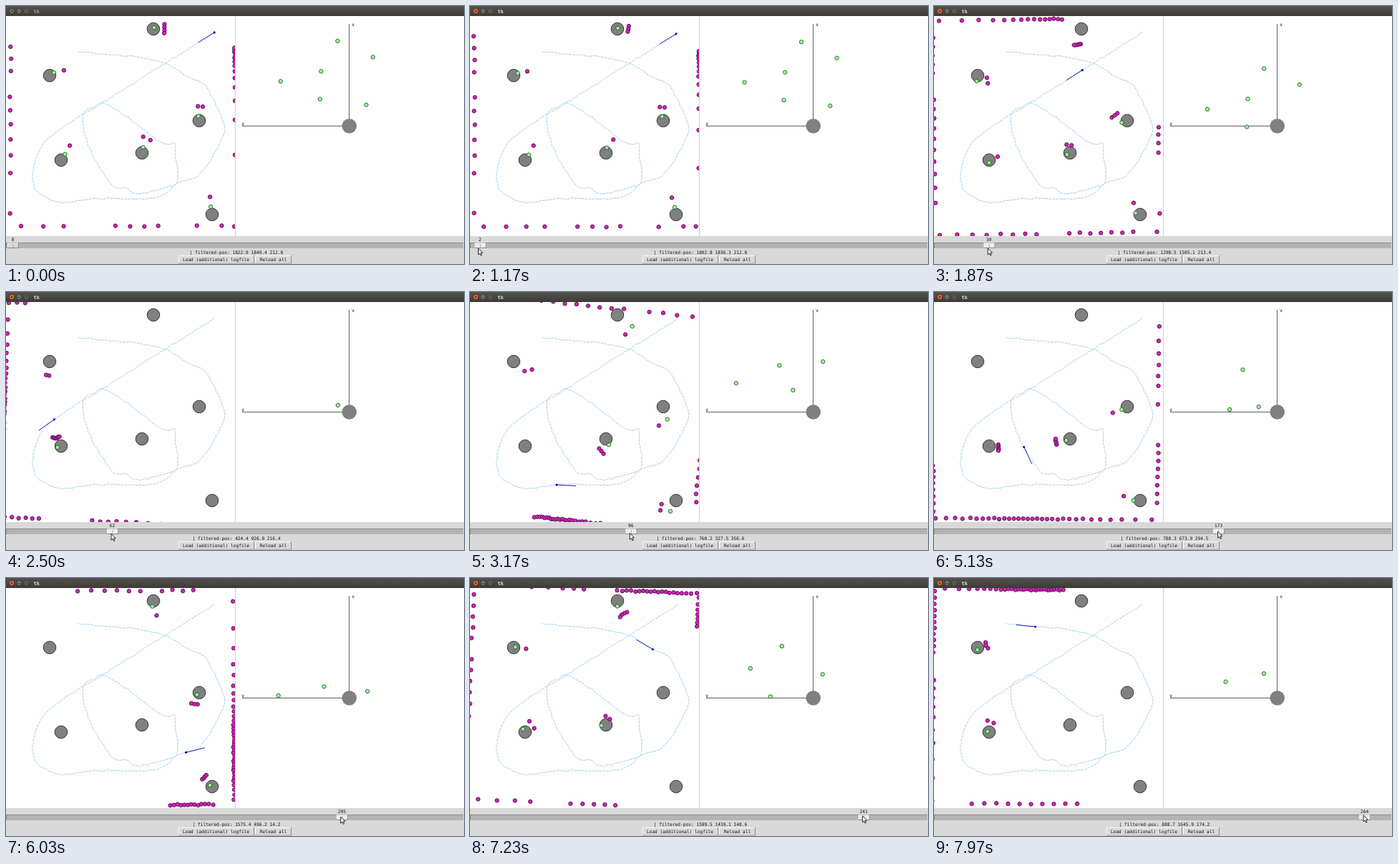
Write an HTML page with a canvas that moves like this. It is 640 by 360 pixels and loops after 8000 ms.

```html
<!DOCTYPE html>
<html lang="en">
<head>
<meta charset="utf-8">
<title>tk</title>
<style>
html, body { margin: 0; width: 100%; height: 100%; overflow: hidden; background: #d9d9d9; }
canvas { display: block; width: 640px; height: 360px; }
</style>
</head>
<body>
<canvas id="stage" width="640" height="360"></canvas>
<script>
const ctx = document.getElementById('stage').getContext('2d');
const LOOP = 8000;
const RAD = Math.PI / 180;
const SX = 0.16, SY = 0.1525;          // world mm to pixels
const SHRINK = 0.965;                  // the scanner measures a little short
const MONO = '"DejaVu Sans Mono", monospace';
const PANEL = '#d9d9d9', POST = '#808080', INK = '#111';

const toPx = (X, Y) => [X * SX - 0.5, 319 - Y * SY];
const lerp = (a, b, u) => a + (b - a) * u;
const clamp = (v, a, b) => Math.min(b, Math.max(a, v));
const wrap = a => ((a + 180) % 360 + 360) % 360 - 180;
const rand = (a, b) => {
  const s = Math.sin(a * 12.9898 + b * 78.233) * 43758.5453;
  return (s - Math.floor(s)) * 2 - 1;
};

// Known poses: when the slider reaches a step, where the robot is, how far the
// scan is shifted and turned, and the waypoints (pixels) to the next pose
const FIXES = [
  { t: 1130, n: 0, at: toPx(1822.9, 1849.4), h: 212.8, shift: [-2, -2], turn: 0, via: [[267, 52]] },
  { t: 1870, n: 30, at: toPx(1298.5, 1505.1), h: 213.4, shift: [-6.5, 6], turn: 0.015,
    via: [[130, 138], [75, 172], [47, 200], [37, 240], [45, 260], [62, 270], [82, 274]] },
  { t: 3170, n: 96, at: toPx(760.2, 327.5), h: 356.6, shift: [0, -1], turn: -0.1,
    via: [[160, 268.5], [211, 267], [239, 244], [236, 208], [236, 191], [227, 194], [214, 189]] },
  { t: 4270, n: 143, at: toPx(1071.3, 1068.4), h: 141.1, shift: [-4, 2], turn: -0.02,
    via: [[138, 136], [124, 140], [108, 152], [115, 195], [147, 248], [169, 254], [175, 260], [195, 261]] },
  { t: 6030, n: 205, at: toPx(1575.4, 496.2), h: 14.2, shift: [-2, 0], turn: 0.005,
    via: [[275, 231], [301, 186], [303, 160], [279, 112]] },
  { t: 7230, n: 241, at: toPx(1599.5, 1439.1), h: 148.6, shift: [-4.5, 7], turn: -0.04,
    via: [[222, 80], [180, 71]] },
  { t: 7970, n: 264, at: toPx(888.7, 1645.9), h: 174.2, shift: [-3, 5], turn: -0.01, via: [] },
  { t: 8260, n: 273, at: [101, 63], h: 174, shift: [-3, 5], turn: -0.01, via: [] }
];
const END = FIXES[FIXES.length - 1].n;

const POSTS = [[206, 32], [61, 97], [270, 160], [77, 215], [190, 205], [288, 291]];
const CORNERS = [[-2, 9], [323, 9], [323, 319], [-2, 319]];

// Steps spread over the waypoints by distance
const track = [];
FIXES.forEach((f, i) => {
  const next = FIXES[i + 1];
  if (!next) return track.push({ xy: f.at, n: f.n });
  const leg = [f.at, ...f.via, next.at];
  const len = [0];
  for (let j = 1; j < leg.length; j++) {
    len.push(len[j - 1] + Math.hypot(leg[j][0] - leg[j - 1][0], leg[j][1] - leg[j - 1][1]));
  }
  leg.slice(0, -1).forEach((xy, j) => {
    track.push({ xy, n: lerp(f.n, next.n, len[j] / len[leg.length - 1]) });
  });
});

// Interval of a sorted list that holds a value, and the fraction inside it
function locate(list, key, v) {
  let i = 0;
  while (i < list.length - 2 && list[i + 1][key] <= v) i++;
  return [i, (v - list[i][key]) / (list[i + 1][key] - list[i][key])];
}

// Catmull-Rom curve through the waypoints
function place(n) {
  const [i, t] = locate(track, 'n', clamp(n, 0, END));
  const get = k => track[clamp(k, 0, track.length - 1)].xy;
  const [a, b, c, d] = [get(i - 1), get(i), get(i + 1), get(i + 2)];
  return [0, 1].map(k => b[k] + 0.5 * t * (c[k] - a[k] +
    t * (2 * a[k] - 5 * b[k] + 4 * c[k] - d[k] + t * (3 * (b[k] - c[k]) + d[k] - a[k]))));
}

function course(n) {
  const a = place(n - 3), b = place(n + 3);
  return Math.atan2((a[1] - b[1]) / SY, (b[0] - a[0]) / SX) / RAD;
}

function poseAt(n) {
  const [i, u] = locate(FIXES, 'n', n);
  const a = FIXES[i], b = FIXES[i + 1];
  const bias = lerp(wrap(a.h - course(a.n)), wrap(b.h - course(b.n)), u);
  return {
    pos: place(n),
    head: (course(n) + bias + 720) % 360,
    shift: a.shift.map((v, k) => lerp(v, b.shift[k], u)),
    turn: lerp(a.turn, b.turn, u)
  };
}

// Sweep the beams over walls and posts as the robot believes them to be
function scan(n, { pos: [px, py], head, shift, turn }) {
  const warp = ([x, y]) => {
    const rx = x - px, ry = y - py;
    return [px + shift[0] + SHRINK * rx + turn * ry, py + shift[1] + SHRINK * ry - turn * rx];
  };
  const corners = CORNERS.map(warp);
  const posts = POSTS.map(p => {
    const [x, y] = warp(p);
    const vx = (x - px) / SX, vy = (py - y) / SY;
    const dist = Math.hypot(vx, vy);
    return { x, y, vx, vy, dist, angle: Math.atan2(vy, vx) / RAD,
      half: Math.asin(Math.min(1, 52 / dist)) / RAD, hits: 0, edge: false };
  });
  const dots = [];
  for (let k = 0; k < 66; k++) {
    const a = head - 4 + (k * 10 - 330) * 0.35156;
    const dx = Math.cos(a * RAD) * SX, dy = -Math.sin(a * RAD) * SY;
    let range = 4000, found = null;
    corners.forEach(([x, y], i) => {
      const [x2, y2] = corners[(i + 1) % 4];
      const ex = x2 - x, ey = y2 - y;
      const t = ((x - px) * ey - (y - py) * ex) / (dx * ey - dy * ex);
      if (t > 0 && t < range) range = t;
    });
    for (const p of posts) {
      if (Math.abs(wrap(a - p.angle)) < p.half && p.dist - 88 < range) {
        range = p.dist - 88;
        found = p;
      }
    }
    if (found) {
      found.hits++;
      found.edge = found.edge || k === 0 || k === 65;
    }
    range += rand(k, n) * 6;
    dots.push([px + dx * range, py + dy * range]);
  }
  return { dots, seen: posts.filter(p => p.hits && !p.edge) };
}

function disc(x, y, r, fill, edge, width = 1) {
  ctx.beginPath();
  ctx.arc(x, y, r, 0, 2 * Math.PI);
  ctx.fillStyle = fill;
  ctx.fill();
  if (edge) {
    ctx.strokeStyle = edge;
    ctx.lineWidth = width;
    ctx.stroke();
  }
}

function line(x1, y1, x2, y2, color, width = 1) {
  ctx.beginPath();
  ctx.moveTo(x1, y1);
  ctx.lineTo(x2, y2);
  ctx.strokeStyle = color;
  ctx.lineWidth = width;
  ctx.stroke();
}

function box(x, y, w, h, fill) {
  ctx.fillStyle = fill;
  ctx.fillRect(x, y, w, h);
}

function raised(x, y, w, h, fill) {
  box(x, y, w, h, '#8c8c8c');
  box(x, y, w - 1, h - 1, '#f8f8f8');
  box(x + 1, y + 1, w - 2, h - 2, fill);
}

function text(s, x, y, align = 'center', font = '6.2px ' + MONO, color = INK) {
  ctx.font = font;
  ctx.textAlign = align;
  ctx.fillStyle = color;
  ctx.fillText(s, x, y);
}

const greenDot = (x, y) => disc(x, y, 2.7, '#99ff99', '#2a5a2a', 0.9);

const trail = new Path2D();
for (let n = 0; n <= END; n++) {
  const [x, y] = place(n);
  trail.lineTo(x + rand(n, 1) * 0.9, y + rand(n, 2) * 0.9);
}

function titleBar(focused) {
  const g = ctx.createLinearGradient(0, 0, 0, 14);
  g.addColorStop(0, '#53524d');
  g.addColorStop(1, '#3c3b37');
  box(0, 0, 640, 14, g);
  const ink = '#35342f', gray = '#77766f';
  disc(8, 7, 3.7, focused ? '#ec6530' : gray, ink, 0.8);
  disc(18.3, 7, 3.4, gray, ink, 0.8);
  disc(28.5, 7, 3.4, gray, ink, 0.8);
  line(6.6, 5.6, 9.4, 8.4, ink, 0.9);
  line(9.4, 5.6, 6.6, 8.4, ink, 0.9);
  line(16.8, 7.5, 19.8, 7.5, ink, 0.9);
  ctx.strokeRect(27.2, 5.8, 2.6, 2.4);
  text('tk', 38.5, 9.8, 'left', 'bold 7px ' + MONO, focused ? '#dfdbd2' : '#a09e97');
}

function worldView({ pos: [x, y], head }, found) {
  ctx.save();
  ctx.beginPath();
  ctx.rect(0, 14, 320, 307);
  ctx.clip();
  POSTS.forEach(([cx, cy]) => disc(cx, cy, 8.8, POST, '#2a2a2a', 0.9));
  ctx.lineWidth = 0.9;
  ctx.strokeStyle = '#cfe4f4';
  ctx.stroke(trail);
  ctx.strokeStyle = '#a2cdf2';
  ctx.setLineDash([2.4, 2.6]);
  ctx.stroke(trail);
  ctx.setLineDash([]);
  line(x, y, x + Math.cos(head * RAD) * 27, y - Math.sin(head * RAD) * 26, '#2020a8');
  disc(x, y, 1.6, '#0808c8');
  found.dots.forEach(([dx, dy]) => disc(dx, dy, 2.7, '#d422b8', '#501048', 0.9));
  found.seen.forEach(p => greenDot(p.x, p.y));
  ctx.restore();
}

function sensorView({ head }, found) {
  line(479.5, 25, 479.5, 158, '#606060');
  line(330, 167.5, 470, 167.5, '#606060');
  text('x', 485, 27.5);
  text('y', 331, 165.5);
  disc(479.7, 167.5, 10.3, POST);
  const c = Math.cos(head * RAD), s = Math.sin(head * RAD);
  found.seen.forEach(({ vx, vy }) => {
    const ahead = c * vx + s * vy, left = c * vy - s * vx;
    greenDot(480 - left * 0.0727, 167 - ahead * 0.0695);
  });
}

function controls(n, { pos, head }, hover) {
  box(0, 321, 640, 39, PANEL);
  box(0, 330, 639, 8, '#8c8c8c');
  box(1, 331, 638, 7, '#b3b3b3');
  const x = 2 + n * 2.243;
  raised(x, 330.5, 16, 7.5, hover ? '#ececec' : PANEL);
  line(x + 8, 332, x + 8, 337, '#a5a5a5', 0.8);
  text(String(n), x + 7.5, 328.3);
  const X = (pos[0] + 0.5) / SX, Y = (319 - pos[1]) / SY;
  text('| filtered-pos: ' + [X, Y, head].map(v => v.toFixed(1)).join(' '), 322, 345.6);
  raised(241, 348, 106, 11.5, PANEL);
  raised(348, 348, 51, 11.5, PANEL);
  text('Load (additional) logfile', 293.5, 355.8);
  text('Reload all', 373.5, 355.8);
}

function pointer(x, y) {
  const shape = [[0, 0], [0, 9], [2.1, 7.1], [3.6, 10.3], [5, 9.6], [3.6, 6.5], [6.3, 6.3]];
  ctx.beginPath();
  shape.forEach(([dx, dy]) => ctx.lineTo(x + dx, y + dy));
  ctx.closePath();
  ctx.fillStyle = '#f4f4f4';
  ctx.fill();
  ctx.strokeStyle = '#181818';
  ctx.lineWidth = 0.9;
  ctx.stroke();
}

function stepAt(t) {
  const [i, u] = locate(FIXES, 't', Math.max(t, FIXES[0].t));
  return lerp(FIXES[i].n, FIXES[i + 1].n, u);
}

function draw(t) {
  const exact = stepAt(t), n = Math.round(exact);
  const pose = poseAt(n), found = scan(n, pose);
  box(0, 0, 640, 360, '#fefefe');
  worldView(pose, found);
  line(320.5, 14, 320.5, 321, '#d0d0de');
  sensorView(pose, found);
  titleBar(t >= 900);
  controls(n, pose, t >= 780);
  if (t >= 30) {
    const u = clamp((t - 30) / 800, 0, 1), e = u * u * (3 - 2 * u);
    const y = lerp(338, 331, clamp((t - 1870) / 6100, 0, 1));
    pointer(lerp(632, 7.8 + exact * 2.243, e), lerp(357, y, e));
  }
}

const start = performance.now();
function frame() {
  draw((performance.now() - start) % LOOP);
  requestAnimationFrame(frame);
}
draw(0);
requestAnimationFrame(frame);
</script>
</body>
</html>
```
